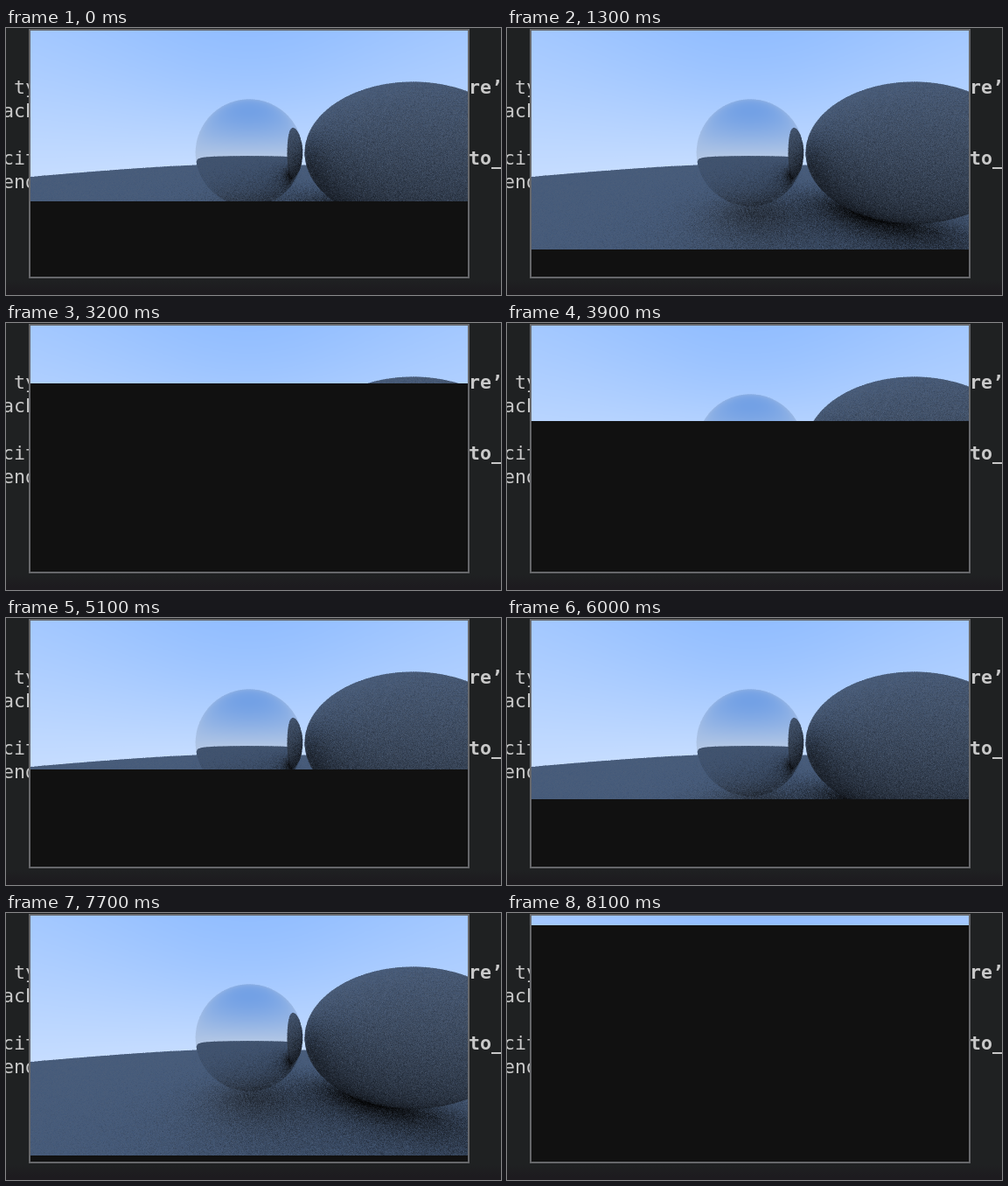
Animation of 566 by 305 pixels, one loop 8.2 s. Source, as an HTML page with a canvas:

```html
<!DOCTYPE html>
<html lang="en">
<head>
<meta charset="utf-8">
<title>Scanline render</title>
<style>
  html, body { margin: 0; width: 100%; height: 100%; overflow: hidden; }
  body {
    position: relative;
    background: linear-gradient(#1f2122 288px, #1d1b1f 301px);
  }
  svg { position: absolute; left: 0; top: 0; }
  text {
    font: 21.6px "DejaVu Sans Mono", monospace;
    fill: #c9c9c9;
    white-space: pre;
  }
  .bold { font-weight: bold; }
  .view {
    position: absolute;
    left: 26px;
    top: 1px;
    width: 500px;
    height: 281px;
    border: 2px solid #66676a;
    background: #111;
    overflow: hidden;
  }
  canvas { position: absolute; left: 0; top: -1px; }
</style>
</head>
<body>
<svg width="566" height="305">
  <text x="9" y="75">ty</text>
  <text x="-4" y="102">ach</text>
  <text x="-4" y="156">cit</text>
  <text x="-4" y="183">end</text>
  <text class="bold" x="529" y="75">re’</text>
  <text class="bold" x="529" y="156">to_</text>
</svg>
<div class="view"><canvas id="scene" width="500" height="281"></canvas></div>
<script>
const W = 500, H = 281, SAMPLES = 22, MAX_BOUNCES = 10;
const canvas = document.getElementById('scene');

const spheres = [
  { x: 0, y: 0, z: -1, r: 0.4, mirror: true, albedo: 0.9 },
  { x: 1, y: 0, z: -1, r: 0.5, mirror: false, albedo: 0.48 },
  { x: 0, y: -100.5, z: -1, r: 100, mirror: false, albedo: 0.48 }
];

let seed = 7;
function random() {
  seed = (Math.imul(seed, 1664525) + 1013904223) >>> 0;
  return seed / 4294967296;
}

// Result of the last traced ray: light left, sky height 0..1, bounces made
let light, sky, bounces;

function trace(dx, dy, dz) {
  let ox = 0, oy = 0, oz = 0;
  light = 1;
  for (bounces = 0; bounces < MAX_BOUNCES; bounces++) {
    const len = Math.sqrt(dx * dx + dy * dy + dz * dz);
    dx /= len; dy /= len; dz /= len;

    let near = Infinity, hit = null;
    for (let i = 0; i < 3; i++) {
      const s = spheres[i];
      const cx = ox - s.x, cy = oy - s.y, cz = oz - s.z;
      const b = cx * dx + cy * dy + cz * dz;
      const disc = b * b - (cx * cx + cy * cy + cz * cz - s.r * s.r);
      if (disc <= 0) continue;
      const root = Math.sqrt(disc);
      const t = -b - root > 0.001 ? -b - root : -b + root;
      if (t > 0.001 && t < near) { near = t; hit = s; }
    }
    if (!hit) {
      sky = 0.5 * (dy + 1);
      return;
    }

    ox += dx * near; oy += dy * near; oz += dz * near;
    const nx = (ox - hit.x) / hit.r, ny = (oy - hit.y) / hit.r, nz = (oz - hit.z) / hit.r;
    light *= hit.albedo;
    if (hit.mirror) {
      const k = 2 * (dx * nx + dy * ny + dz * nz);
      dx -= k * nx; dy -= k * ny; dz -= k * nz;
    } else {
      const u = 2 * random() - 1, a = 2 * Math.PI * random(), q = Math.sqrt(1 - u * u);
      dx = nx + q * Math.cos(a); dy = ny + q * Math.sin(a); dz = nz + u;
    }
  }
  light = sky = 0;
}

function render() {
  const ctx = canvas.getContext('2d');
  const image = ctx.createImageData(W, H);
  for (let y = 0, p = 0; y < H; y++) {
    for (let x = 0; x < W; x++, p += 4) {
      let r = 0, g = 0, b = 0, n = 0, touched = false;
      while (n < SAMPLES) {
        trace((2 * (x + random()) - W) / H, (H - 2 * (y + random())) / H, -1);
        r += light * (1 - 0.5 * sky);
        g += light * (1 - 0.3 * sky);
        b += light;
        n++;
        if (bounces) touched = true;
        if (n === 6 && !touched) break;   // open sky needs no more
      }
      image.data[p] = 255 * r / n;
      image.data[p + 1] = 255 * g / n;
      image.data[p + 2] = 255 * b / n;
      image.data[p + 3] = 255;
    }
  }
  ctx.putImageData(image, 0, 0);
}

// [step, stage y of the lowest finished line]; one step lasts 100 ms
const STEP = 100, STEPS = 82;
const progress = [
  [0, 198], [9, 235], [13, 253], [18, 278], [19, 283],
  [20, 5], [24, 29], [26, 29], [35, 89], [39, 112], [44, 142],
  [51, 173], [53, 181], [62, 215], [69, 242], [71, 250], [78, 281],
  [79, 3], [80, 9], [81, 14]
];

function lineAt(step) {
  const i = progress.findIndex(k => k[0] >= step);
  const [s1, y1] = progress[i];
  if (s1 === step) return y1;
  const [s0, y0] = progress[i - 1];
  return Math.round(y0 + (y1 - y0) * (step - s0) / (s1 - s0));
}

function show(now) {
  const step = Math.floor(Math.max(0, now - start) / STEP) % STEPS;
  canvas.style.clipPath = `inset(0 0 ${H + 2 - lineAt(step)}px 0)`;
  requestAnimationFrame(show);
}

render();
const start = performance.now();
show(start);
</script>
</body>
</html>
```
